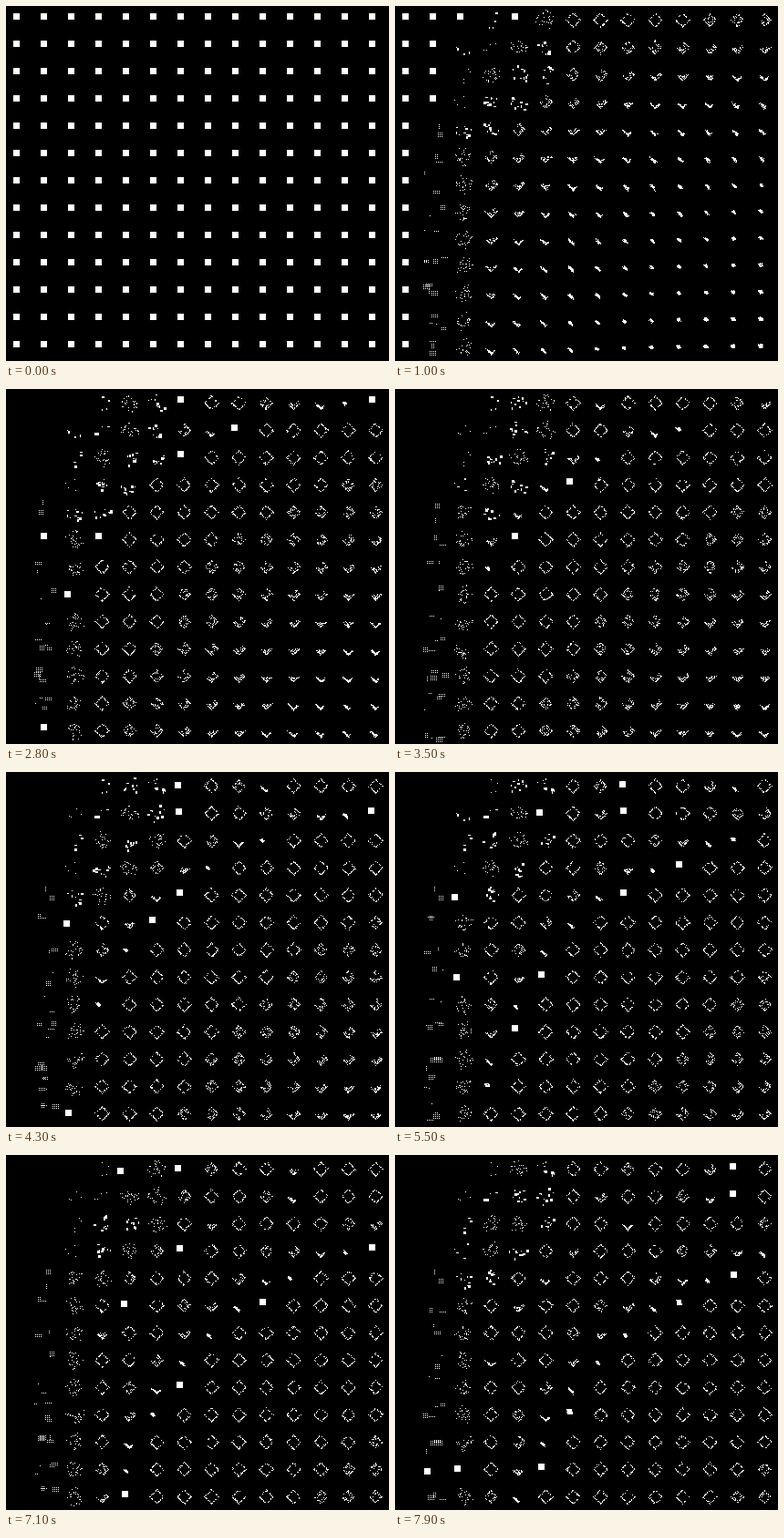
Write an HTML page with a canvas that moves like this. It is 420x390 px and loops after 8 s.

```html
<!DOCTYPE html>
<html>
<head>
<meta charset="utf-8">
<style>
html, body { margin: 0; width: 100%; height: 100%; overflow: hidden; background: #000; }
canvas { display: block; }
</style>
</head>
<body>
<canvas id="stage" width="420" height="390"></canvas>
<script>
const ctx = document.getElementById('stage').getContext('2d');
const COLS = 14, ROWS = 13, PITCH = 30, SIDE = 7, STEP = 100, LOOP = 8000;

// Repeatable noise in 0..1
function noise(a, b = 0, c = 0) {
  const v = Math.sin(a * 12.9898 + b * 78.233 + c * 37.719) * 43758.5453;
  return v - Math.floor(v);
}

const dot = (x, y, w = 1, h = w) => ctx.fillRect(Math.round(x), Math.round(y), w, h);
const mix = (a, b, k) => a + (b - a) * k;

// Triangle wave: 1 at 0, -1 at one half
const tri = u => Math.abs((u - Math.floor(u)) * 4 - 2) - 1;

// Point on a diamond, running anticlockwise from the top
const diamond = (s, radius) => [15 - tri(s - 0.25) * radius, 15 - tri(s) * radius];

function square(x, y, shift) {
  dot(x + 8 - shift, y + 8 + shift, SIDE);
}

// The square slides down its diagonal, then smears around a diamond as p grows
function ring(x, y, p, seed) {
  const start = Math.min(0.25, 0.125 + 1.25 * p);
  const blend = Math.min(1, p / 0.1);
  const thick = Math.max(0, 5 - 16 * p);
  for (let i = 0; i < SIDE * SIDE; i++) {
    const px = i % SIDE, py = Math.floor(i / SIDE);
    if (p > 0.2 && noise(i, seed, 2) > 0.8) continue;
    const f = mix((py - px + 6) / 12, noise(i, seed), 0.3 + 0.7 * Math.min(1, p * 3));
    const depth = (px + py) / 12;
    let radius = 7.5 + (noise(i, seed, 5) - 0.5) * 1.6 - depth * thick;
    if (p > 0.2 && p < 0.45) radius -= noise(i, 8) > 0.83 ? 3.5 : 0.7;
    const [dx, dy] = diamond(start + f * 2.4 * p, radius);
    dot(x + mix(8 + px, dx, blend), y + mix(8 + py, dy, blend));
  }
}

// Short periods break the square into loose chunks
function shards(x, y, col, row, k, p, seed) {
  const fine = col === 2 && row > 4 || p > 0.6;
  const few = col === 2 && row < 4 || col === 3 && row < 2;
  const count = few ? 4 : fine ? 27 : 10;
  for (let i = 0; i < count; i++) {
    const phase = few ? 0 : k;
    const [dx, dy] = diamond(0.2 + noise(i, seed) * Math.min(1, 0.3 + 2 * p), 7);
    const jx = (noise(i, seed, phase) - 0.5) * 8;
    const jy = (noise(i, seed + 5, phase) - 0.5) * 8;
    const w = fine ? 1 : 1 + Math.floor(noise(i, seed, 4) * 3);
    const h = fine ? 1 : 1 + Math.floor(noise(i, seed, 6) * 3);
    dot(x + dx + jx, y + dy + jy, w, h);
  }
}

// Small lattices of single dots in the second column
function lattice(x, y, row, k, seed) {
  const groups = row > 8 ? 4 : 2;
  for (let g = 0; g < groups; g++) {
    const gx = x + 1 + Math.floor(noise(g, seed, k) * 22);
    const gy = y + 2 + Math.floor(noise(g, seed + 2, k) * 22);
    const w = 1 + Math.floor(noise(g, seed, 9) * 4);
    const h = 1 + Math.floor(noise(g, seed, 2) * 3);
    for (let i = 0; i < w * h; i++) dot(gx + 2 * (i % w), gy + 2 * Math.floor(i / w));
  }
}

function drawCell(col, row, n) {
  const x = col * PITCH, y = row * PITCH, seed = col * 17 + row * 5;
  const period = (col + 1) * (row + 2), k = n % period, p = k / period;
  const slide = Math.round(k * 320 / ((col + 1) * period));
  const corner = col === 0 || col === 1 && row < 4 || col === 2 && row === 0;

  if (n === 0) return square(x, y, 0);
  if (corner) {
    if (n < 25) square(x, y, 0);
    return;
  }
  if (k < 2 && slide < 9) return square(x, y, slide);
  if (col === 1) lattice(x, y, row, k, seed);
  else if (col === 2 || col < 6 && period < 26) shards(x, y, col, row, k, p, seed);
  else ring(x, y, p, seed);
}

function draw(now) {
  const n = Math.floor(now % LOOP / STEP);
  ctx.fillStyle = '#000';
  ctx.fillRect(0, 0, 420, 390);
  ctx.fillStyle = '#fff';
  for (let row = 0; row < ROWS; row++) {
    for (let col = 0; col < COLS; col++) drawCell(col, row, n);
  }
}

let begin;
function tick(now) {
  begin ??= now;
  draw(Math.max(0, now - begin));
  requestAnimationFrame(tick);
}
draw(0);
requestAnimationFrame(tick);
</script>
</body>
</html>
```
